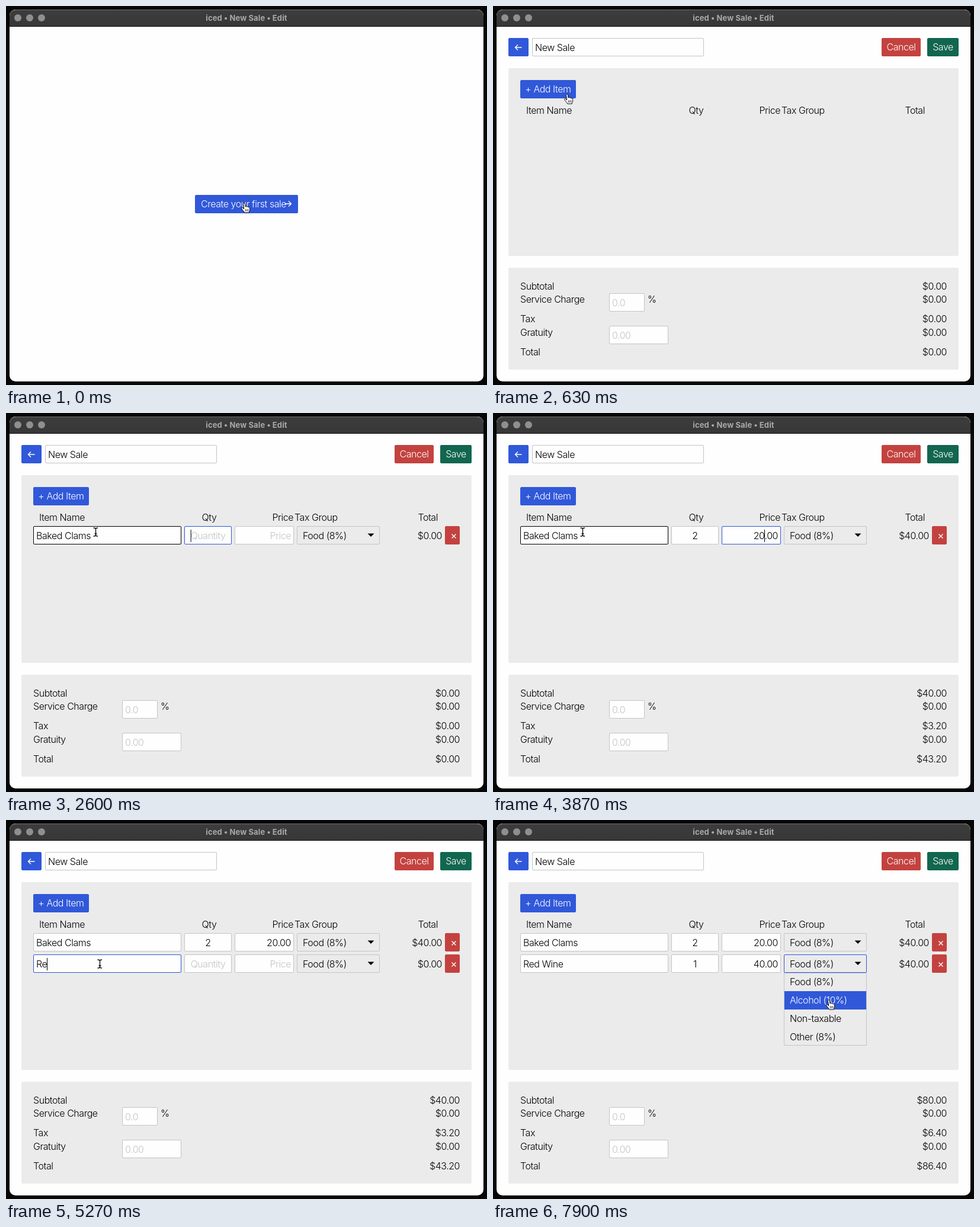
An HTML page that plays this animation: 812 px wide and 640 px high, repeating every 8000 ms.

```html
<!DOCTYPE html>
<html lang="en">
<head>
<meta charset="utf-8">
<title>iced • New Sale • Edit</title>
<style>
  html, body { margin: 0; width: 100%; height: 100%; overflow: hidden; background: #060606; }
  #stage { position: relative; width: 812px; height: 640px; overflow: hidden;
    font: 300 16px/20px Inter, sans-serif; letter-spacing: -.45px;
    font-variation-settings: "opsz" 32; color: #000; }
  #stage div, #stage svg { position: absolute; box-sizing: border-box; white-space: pre; }
  .win { left: 6px; top: 6px; width: 800px; height: 628px; border-radius: 10px; background: #fefefe; overflow: hidden; }
  .bar { left: 0; top: 0; width: 800px; height: 29px; background: linear-gradient(#3d3d3d, #373737);
    border-top: 1px solid #727272; border-bottom: 1px solid #0c0c0c; border-radius: 10px 10px 0 0; }
  .title { left: 0; width: 800px; top: 3px; text-align: center; color: #a9a9a9;
    font: 700 13px/20px Inter, sans-serif; letter-spacing: .1px; font-variation-settings: normal; }
  .dot { width: 12px; height: 12px; top: 7px; border-radius: 50%; background: #8f8f8f; }
  .panel { background: #ebebeb; border-radius: 2px; }
  .box { border-radius: 2px; border: 1px solid #c4c4c4; background: #fefefe; }
  .ph { color: #c4c4c4; }
  .w { color: #fff; }
  .caret { display: inline-block; position: relative; width: 0; height: 10px; }
  .caret::after { content: ""; position: absolute; left: 0; top: -6px; width: 1px; height: 21px; background: #000; }
</style>
</head>
<body>
<div id="stage">
  <div class="win"><div class="bar">
    <div class="dot" style="left:8px"></div><div class="dot" style="left:28px"></div><div class="dot" style="left:48px"></div>
    <div class="title">iced • New Sale • Edit</div>
  </div></div>
  <div id="view"></div>
  <svg id="cursor" width="812" height="640" style="left:0;top:0"><g stroke-linejoin="round" stroke-linecap="round"></g></svg>
</div>
<script>
const LOOP = 8000, BLINK = 320;
const BLUE = '#3058d9', RED = '#c3423f', GREEN = '#12664f', GREY = '#c4c4c4';
const view = document.getElementById('view');
const pointer = document.querySelector('#cursor g');

// time, x, y, easing of the move that ends here
const path = [
  [30, 402, 333], [600, 125, 149, 'both'], [740, 126, 150, 'both'], [1030, 151, 201, 'out'],
  [3870, 151, 201], [4140, 96, 140, 'both'], [4200, 97, 141, 'both'], [4630, 158, 243, 'both'],
  [7170, 158, 243], [7300, 197, 248, 'in'], [7570, 558, 240, 'out'], [7650, 560, 241, 'both'],
  [7890, 567, 304, 'both']
];
const ease = {
  in: u => u * u,
  out: u => 1 - (1 - u) ** 2,
  both: u => u * u * (3 - 2 * u)
};

const every = (start, gap, n) => Array.from({ length: n }, (_, i) => start + i * gap);
const keys = {
  name0: ['Baked Clams', every(1730, 67, 11)],
  qty0: ['2', [2830]],
  price0: ['20', [3200, 3230]],
  name1: ['Red Wine', [5130, 5270, 5330, 5400, 5470, 5530, 5600, 5670]],
  qty1: ['1', [6270]],
  price1: ['40', [6800, 6830]]
};
const focusAt = [
  [948, 'name0'], [2600, 'qty0'], [3000, 'price0'], [4170, ''], [4580, 'name1'],
  [5800, 'qty1'], [6590, 'price1'], [7200, 'service'], [7600, '']
];
const rowAt = [735, 4170], openAt = 7600;
const edits = [...focusAt.map(f => f[0]), ...Object.values(keys).flatMap(k => k[1])].sort((a, b) => a - b);

const shapes = {
  hand: `<path fill="#fff" stroke="#000" d="M-1.6 1.2C-1.6-.6 1.2-.6 1.4 1L2 6C2.4 4.8 4.4 4.8 4.7 6.2C5.3 5.2 7 5.6 7.2 7C8 6.2 9.6 6.8 9.6 8.2V10.5C9.6 13 8.4 13.5 8.2 16H.6C0 14-2.6 12-4 9.6C-5.2 8-3.4 6.8-2 8.2L-.6 9.4Z"/>
    <path fill="none" stroke="#000" stroke-width=".8" d="M2.4 10.5v3M4.6 10.5v3M6.8 10.5v3"/>`,
  arrow: '<path stroke="#fff" d="M0 0V15L3.5 11.8L6 17L8.2 16L5.8 11H10.5Z"/>',
  beam: ['#fff" stroke-width="3', '#000" stroke-width="1.3'].map(s =>
    `<path fill="none" stroke="${s}" d="M-3-7Q0-7 .5-5.5Q1-7 3.5-7M.5-5.5V5.5M-3 7Q0 7 .5 5.5Q1 7 3.5 7M-1 3H2"/>`).join('')
};

let mouse, kind, focus, caretOn;

function mouseAt(t) {
  let i = path.findIndex(p => p[0] > t);
  if (i < 0) i = path.length;
  const a = path[Math.max(i - 1, 0)], b = path[i];
  if (!b || i === 0) return { x: a[1], y: a[2] };
  const u = (ease[b[3]] || (v => v))((t - a[0]) / (b[0] - a[0]));
  return { x: a[1] + (b[1] - a[1]) * u, y: a[2] + (b[2] - a[2]) * u };
}

function over(x, y, w, h, shape) {
  const hit = mouse.x >= x && mouse.x < x + w && mouse.y >= y && mouse.y < y + h;
  if (hit) kind = shape;
  return hit;
}

const rect = (cls, x, y, w, h, css = '') =>
  `<div class="${cls}" style="left:${x}px;top:${y}px;width:${w}px;height:${h}px;${css}"></div>`;

// y is the middle of the line
function text(x, y, s, align = 'left', cls = '') {
  const at = align === 'right' ? `right:${-x}px` : `left:${x}px`;
  const mid = align === 'center' ? ';transform:translateX(-50%)' : '';
  return `<div class="${cls}" style="${at};top:${y - 10}px${mid}">${s}</div>`;
}

const icon = (x, y, d, css) =>
  `<svg width="20" height="20" viewBox="-10 -10 20 20" style="left:${x - 10}px;top:${y - 10}px"><path d="${d}" style="${css}"/></svg>`;
const LINE = 'fill:none;stroke:#fff;stroke-width:1.4';
const RIGHT = 'M-5.5 0H5.5M1-4.5L5.5 0L1 4.5', LEFT = 'M5.5 0H-5.5M-1-4.5L-5.5 0L-1 4.5';

function button(x, y, w, color, label = '') {
  over(x, y, w, 31, 'hand');
  return rect('box', x, y, w, 31, `background:${color};border-color:${color}`) +
    text(x + w / 2, y + 15, label, 'center', 'w');
}

function field(id, x, y, w, value, hint, align = 'left', tail = '') {
  const hit = over(x, y, w, 31, 'beam'), on = focus === id;
  const caret = on && caretOn ? '<i class="caret"></i>' : '';
  const tx = align === 'left' ? x + 5 : align === 'right' ? x + w - 5 : x + w / 2;
  const body = value ? value + caret + tail : caret + hint;
  const html = rect('box', x, y, w, 31, `border-color:${on ? BLUE : hit ? '#000' : GREY}`) +
    text(tx, y + 15.5, value ? body : body, align, value ? '' : 'ph');
  return html;
}

function select(x, y, open) {
  const hit = over(x, y, 140, 31, 'hand');
  return rect('box', x, y, 140, 31, `background:#ebebeb;border-color:${open || hit ? BLUE : GREY}`) +
    text(x + 10, y + 15.5, 'Food (8%)') + icon(x + 125, y + 15, 'M-5.5-2.5H5.5L0 3Z', 'fill:#000');
}

function menu(x, y) {
  const items = ['Food (8%)', 'Alcohol (10%)', 'Non-taxable', 'Other (8%)'];
  const hits = items.map((_, i) => over(x, y + i * 30.8, 140, 30.8, 'hand'));
  const pick = Math.max(hits.indexOf(true), 0);
  return rect('box', x, y, 140, 123, 'background:#ebebeb;border-radius:0') +
    rect('', x + 1, Math.round(y + pick * 30.8), 138, 31, `background:${BLUE}`) +
    items.map((s, i) => text(x + 10, Math.round(y + 15.4 + i * 30.8), s, 'left', i === pick ? 'w' : '')).join('');
}

const money = v => '$' + v.toFixed(2);

function saleView(t) {
  const typed = id => keys[id][0].slice(0, keys[id][1].filter(k => k <= t).length);
  let sub = 0;
  let html = button(26, 54, 34, BLUE) + icon(43, 69.5, LEFT, LINE) +
    field('title', 66, 54, 290, 'New Sale', '') +
    button(656, 54, 66, RED, 'Cancel') + button(733, 54, 53, GREEN, 'Save') +
    rect('panel', 26, 105, 760, 317) + rect('panel', 26, 442, 760, 172) +
    button(46, 125, 94, BLUE, '+ Add Item') +
    text(56, 176, 'Item Name') + text(343, 176, 'Qty', 'center') + text(485, 176, 'Price', 'right') +
    text(487, 176, 'Tax Group') + text(729, 176, 'Total', 'right');
  rowAt.forEach((start, i) => {
    if (t < start) return;
    const y = 191 + i * 36, qty = typed('qty' + i), price = typed('price' + i), sum = qty * price;
    sub += sum;
    html += field('name' + i, 46, y, 250, typed('name' + i), 'Item name') +
      field('qty' + i, 301, y, 80, qty, 'Quantity', 'center') +
      field('price' + i, 386, y, 100, price, 'Price', 'right', '.00') +
      select(491, y, i === 1 && t >= openAt) + text(736, y + 15.5, money(sum), 'right') +
      button(741, y, 25, RED) + icon(755.5, y + 16.5, 'M-3.5-3.5L3.5 3.5M3.5-3.5L-3.5 3.5', LINE);
  });
  const tax = sub * .08;
  [['Subtotal', 473, sub], ['Service Charge', 495, 0], ['Tax', 528, tax], ['Gratuity', 551, 0], ['Total', 584, sub + tax]]
    .forEach(([label, y, v]) => { html += text(46, y, label) + text(766, y, money(v), 'right'); });
  html += field('service', 196, 485, 60, '', '0.0') + text(261, 495, '%') + field('tip', 196, 540, 100, '', '0.00');
  return t >= openAt ? html + menu(491, 258) : html;
}

const firstView = () => button(319, 319, 174, BLUE) + text(329, 334, 'Create your first sale', 'left', 'w') + icon(476, 333.5, RIGHT, LINE);

let shown = '', shownKind = '';
function draw(t) {
  mouse = mouseAt(t);
  kind = 'arrow';
  focus = (focusAt.filter(f => f[0] <= t).pop() || [0, ''])[1];
  const last = edits.filter(e => e <= t).pop() || 0;
  caretOn = Math.floor((t - last) / BLINK) % 2 === 0;
  const html = t < 30 ? firstView() : saleView(t);
  if (html !== shown) view.innerHTML = shown = html;
  if (kind !== shownKind) pointer.innerHTML = shapes[shownKind = kind];
  pointer.setAttribute('transform', `translate(${mouse.x.toFixed(1)} ${mouse.y.toFixed(1)})`);
}

const begin = performance.now();
function tick() {
  draw((performance.now() - begin) % LOOP);
  requestAnimationFrame(tick);
}
tick();
</script>
</body>
</html>
```
